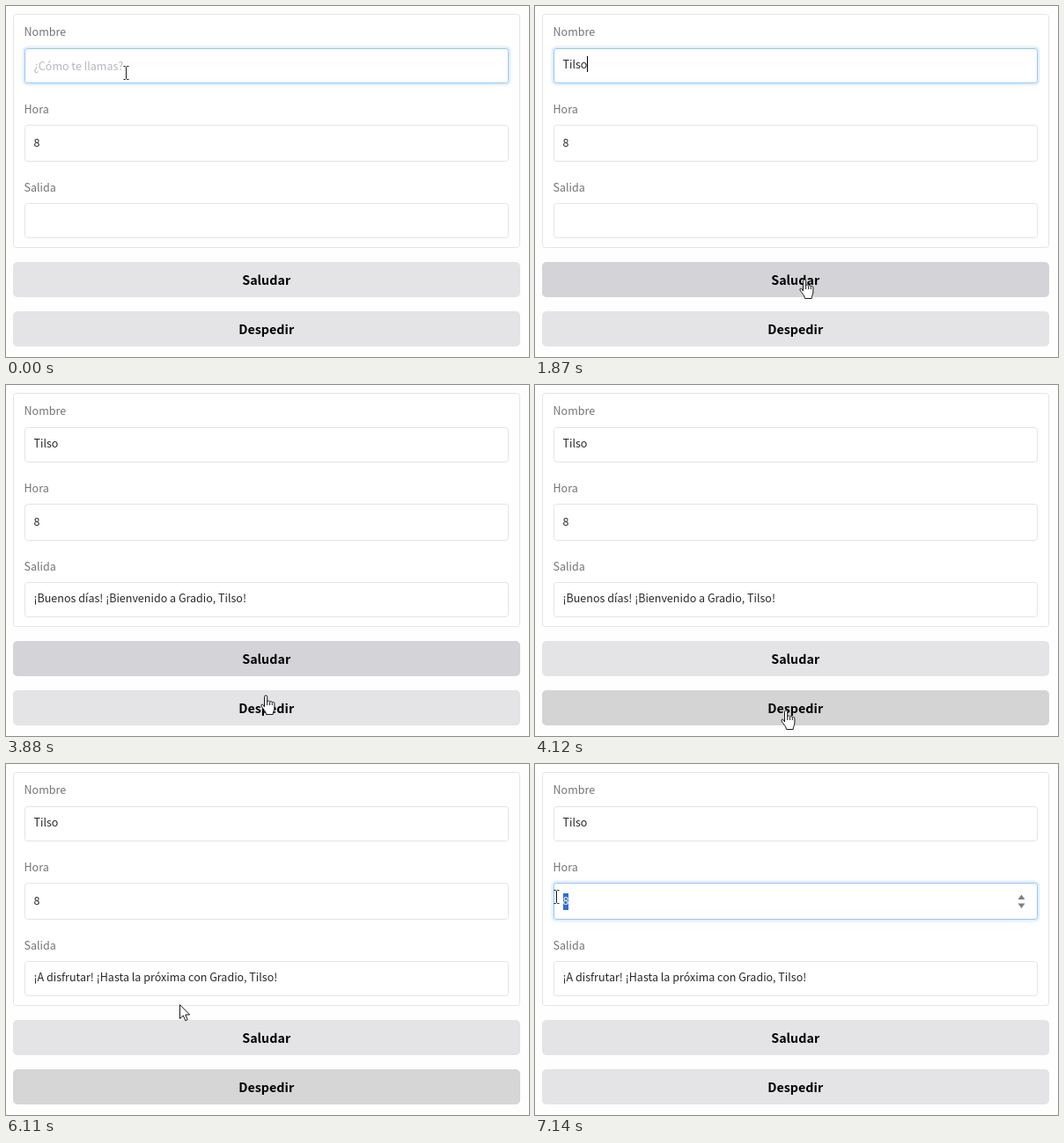
An HTML page for the animation above (8000 ms loop, 594 by 399 pixels).

```html
<!DOCTYPE html>
<html lang="es">
<head>
<meta charset="utf-8">
<title>Saludos</title>
<style>
  html, body { margin: 0; width: 100%; height: 100%; overflow: hidden; background: #fefefe; }
  svg { display: block; width: 594px; height: 399px; }
  text {
    font: 12.53px "Noto Sans CJK JP", "Noto Sans CJK SC", "Noto Sans CJK", "Open Sans", sans-serif;
    fill: #27272a;
    white-space: pre;
  }
  .label { fill: #737378; }
  .hint { fill: #b6b6be; }
  .button { font-size: 14.3px; font-weight: 600; text-anchor: middle; fill: #000; }
  .status { font: 12px "Liberation Mono", monospace; text-anchor: end; fill: #000; }
  .box { fill: #fff; stroke: #e4e4e7; }
  .ring { fill: none; stroke: #e3f0fe; stroke-width: 4; }
  .focus .box { stroke: #93c5fd; }
  .field:not(.focus) .ring { display: none; }
  .cursor { fill: #fff; stroke: #18181b; stroke-linejoin: round; }
</style>
</head>
<body>
<svg viewBox="0 0 594 399">
  <rect class="box" x="8.5" y="9.5" width="575" height="265" rx="3"/>

  <text class="label" x="20.5" y="34">Nombre</text>
  <g class="field" id="nameField">
    <rect class="ring" x="20.5" y="47.5" width="551" height="41" rx="4"/>
    <rect class="box" x="21.5" y="48.5" width="549" height="39" rx="3"/>
  </g>
  <text class="hint" id="hint" x="31.5" y="73">¿Cómo te llamas?</text>
  <text id="name" x="31.5" y="71"></text>
  <rect id="caret" y="57" width="1" height="18"/>

  <text class="label" x="20.5" y="122">Hora</text>
  <g class="field" id="hourField">
    <rect class="ring" x="20.5" y="134.5" width="551" height="43" rx="4"/>
    <rect class="box" x="21.5" y="135.5" width="549" height="41" rx="3"/>
  </g>
  <rect id="mark" x="32" y="147" width="6" height="19" fill="#2f6dd0"/>
  <text id="hour" x="31.5" y="160">8</text>
  <path id="spin" fill="#808084" d="M548.5 154 L552.5 148.5 L556.5 154 Z M548.5 158.5 H556.5 L552.5 164 Z"/>

  <rect class="box" x="21.5" y="224.5" width="549" height="39" rx="3"/>
  <text id="output" x="31.5" y="247"></text>
  <rect id="veil" x="21" y="201" width="553" height="66" fill="#fafafa"/>
  <text class="label" id="outLabel" x="20.5" y="211">Salida</text>
  <g id="busy">
    <circle cx="294.5" cy="230" r="7" fill="#f97d2a"/>
    <text class="status" x="574.5" y="265">processing | 0.1/0.1s</text>
  </g>

  <rect id="greet" x="8" y="291" width="576" height="40" rx="5"/>
  <text class="button" x="295.7" y="317">Saludar</text>
  <rect id="leave" x="8" y="347" width="576" height="40" rx="5"/>
  <text class="button" x="295.7" y="373">Despedir</text>

  <g id="cursor" class="cursor">
    <path id="arrow" d="M.5 .7 V16.5 L4.3 13 L6.8 18.7 L9.2 17.6 L6.8 12 H11.6 Z"/>
    <g id="hand">
      <path d="M4.5 14 V2.5 a1.6 1.6 0 0 1 3.2 0 V8 c0 -1.3 2.9 -1.3 2.9 .3 c.3 -1.1 2.7 -.9 2.7 .6 c.4 -.9 2.6 -.6 2.6 1 V15 c0 3 -1.7 4 -1.7 7.5 H6.6 C6.3 19 2.6 16 1.2 13.2 C.3 11.3 1.9 10.4 3.1 11.6 Z"/>
      <path d="M7.7 8 V12 M10.6 8.5 V12 M13.3 9.2 V12"/>
    </g>
    <path id="beam" fill="none" d="M.5 .5 H2.5 L3.5 1.5 L4.5 .5 H6.5 M3.5 1.5 V14.5 M.5 15.5 H2.5 L3.5 14.5 L4.5 15.5 H6.5"/>
  </g>
</svg>
<script>
const LOOP = 8000;
const PERSON = "Tilso";
const HELLO = `¡Buenos días! ¡Bienvenido a Gradio, ${PERSON}!`;
const BYE = `¡A disfrutar! ¡Hasta la próxima con Gradio, ${PERSON}!`;
const IDLE = "#e4e4e6", HOVER = "#d4d4d8", MID = "#dcdcdf", DARK = "#d4d4d4";

// Each step changes part of the state: [time in ms, changes]
const steps = [
  [0, { typed: 0, caret: 0, focus: "name", output: "", wait: 0, marked: 0,
        greet: IDLE, leave: IDLE, cursor: ["beam", 133, 68] }],
  [250, { typed: 1, caret: 1 }],
  [370, { typed: 2 }],
  [520, { typed: 3 }],
  [670, { typed: 5 }],
  [1200, { caret: 0 }],
  [1480, { cursor: ["arrow", 225, 205] }],
  [1600, { cursor: ["arrow", 300, 331] }],
  [1750, { cursor: ["hand", 300, 314], greet: MID, caret: 1 }],
  [1870, { cursor: ["hand", 300, 310], greet: HOVER }],
  [2150, { focus: "", caret: 0 }],
  [2300, { wait: 1 }],
  [2420, { wait: 0, output: HELLO }],
  [3880, { cursor: ["hand", 289, 352] }],
  [4000, { cursor: ["hand", 282, 363], greet: MID, leave: MID }],
  [4120, { cursor: ["hand", 279, 369], greet: IDLE, leave: DARK }],
  [5120, { wait: 2 }],
  [5270, { wait: 0, output: BYE }],
  [6110, { cursor: ["arrow", 197, 273], leave: "#d6d6d6" }],
  [6230, { cursor: ["arrow", 138, 203], leave: IDLE }],
  [6350, { cursor: ["beam", 92, 142] }],
  [6470, { cursor: ["arrow", 71, 113], focus: "hour" }],
  [6750, { cursor: ["beam", 58, 148] }],
  [6870, { cursor: ["beam", 41, 146], marked: 0 }],
  [6990, { cursor: ["beam", 24, 143], marked: 1 }],
  [7140, { cursor: ["beam", 21, 143] }]
];

const el = id => document.getElementById(id);
const show = (id, on) => { el(id).style.display = on ? "" : "none"; };

function stateAt(time) {
  return Object.assign({}, ...steps.filter(([at]) => at <= time).map(([, change]) => change));
}

function draw(s) {
  el("name").textContent = PERSON.slice(0, s.typed);
  show("hint", !s.typed);
  show("caret", s.caret);
  if (s.caret) el("caret").setAttribute("x", Math.floor(31.5 + el("name").getComputedTextLength()));

  el("nameField").classList.toggle("focus", s.focus === "name");
  el("hourField").classList.toggle("focus", s.focus === "hour");
  show("spin", s.focus === "hour");
  show("mark", s.marked);
  el("hour").style.fill = s.marked ? "#fff" : "";

  el("output").textContent = s.output;
  show("veil", s.wait);
  show("busy", s.wait === 2);
  el("outLabel").style.opacity = s.wait === 1 ? 0.5 : 1;

  el("greet").setAttribute("fill", s.greet);
  el("leave").setAttribute("fill", s.leave);

  const [kind, x, y] = s.cursor;
  for (const id of ["arrow", "hand", "beam"]) show(id, id === kind);
  el("cursor").setAttribute("transform", `translate(${x} ${y})`);
}

function tick() {
  draw(stateAt(performance.now() % LOOP));
  requestAnimationFrame(tick);
}
tick();
</script>
</body>
</html>
```
